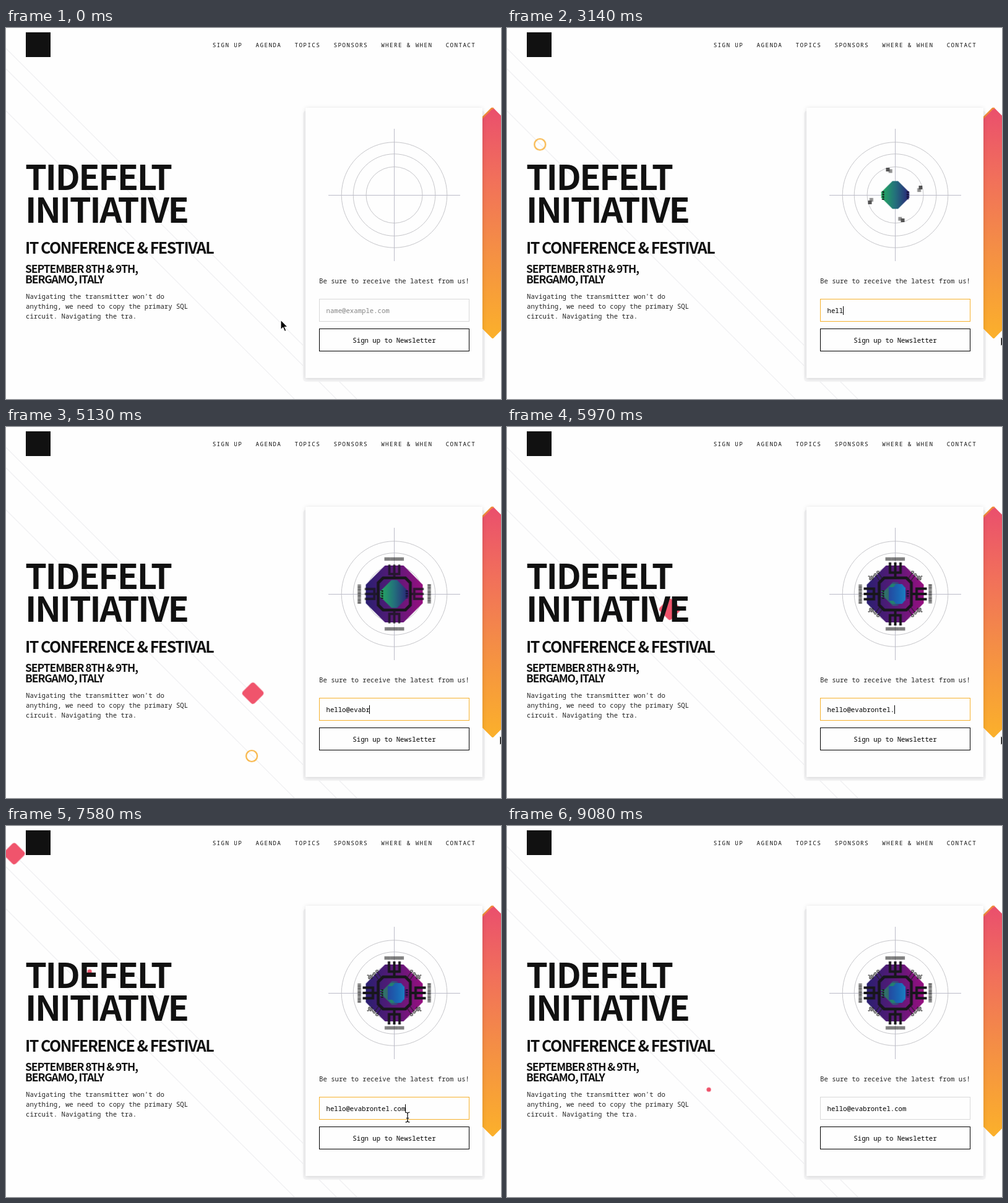
Recreate the animation shown at these times as an HTML page. Size 800 by 600 pixels, loop 9.18 s.

```html
<!DOCTYPE html>
<html lang="en">
<head>
<meta charset="utf-8">
<title>Conference sign-up</title>
<style>
html, body { margin: 0; width: 100%; height: 100%; overflow: hidden; background: #fefefe; }
svg { display: block; width: 800px; height: 600px; }
text { font: 10.667px "Noto Sans Mono", monospace; fill: #222; white-space: pre; }
.nav text { font-size: 9.333px; letter-spacing: 1.333px; fill: #111; }
.title text { font-family: "Noto Sans CJK JP", "Noto Sans CJK SC", "Noto Sans CJK", sans-serif; font-weight: 700; fill: #111; }
.title .h1 { font-size: 56px; font-weight: 900; letter-spacing: -2.4px; }
.title .h2 { font-size: 25px; letter-spacing: -1.5px; }
.title .h3 { font-size: 17.5px; letter-spacing: -1.1px; }
.card { filter: drop-shadow(0 1px 3px rgba(0, 0, 0, .13)); }
.cursor { filter: drop-shadow(0 0 .6px #fff); }

:where(.ring, .gem, .dot, .ghost, .chip g[class]) { animation: 9180ms linear infinite; }
.ring { animation-name: ring; }
.gem { animation-name: gem; }
.dot { animation-name: dot; }
.core { animation-name: core; }
.shrink { animation-name: shrink; }
.marks { animation-name: marks; }
.ghost { animation-name: ghost; }
.bars { animation-name: bars; }
.shield { animation-name: shield; }
.frame { animation-name: frame; }
.combs { animation-name: combs; }
.heart { animation-name: heart; }
.wires { animation-name: wires; }

@keyframes ring {
  0%, 28.76% { transform: translate(-15.4px, 119.6px); animation-timing-function: cubic-bezier(.333, .247, .667, .58); }
  63.18%, 100% { transform: translate(538.4px, 673.4px); }
}
@keyframes gem {
  0%, 43.57% { transform: translate(587.8px, 619.3px); animation-timing-function: cubic-bezier(.333, .354, .667, .688); }
  85.51%, 100% { transform: translate(-27.2px, 4.3px); }
}
@keyframes dot {
  0%, 67.54% { transform: translate(-8.1px, 92.1px); animation-timing-function: cubic-bezier(.333, .264, .667, .597); }
  100% { transform: translate(340px, 440.2px); }
}
@keyframes core {
  0%, 28.1% { transform: scale(0); animation-timing-function: ease-out; }
  31.6%, 100% { transform: none; }
}
@keyframes shrink {
  0%, 58% { transform: none; opacity: 1; }
  61.5%, 100% { transform: scale(.85); opacity: .65; }
}
@keyframes marks {
  0%, 32% { opacity: 0; transform: rotate(-25deg); animation-timing-function: ease-out; }
  34.2% { opacity: .75; transform: none; }
  36%, 100% { opacity: 1; transform: none; }
}
@keyframes ghost {
  0%, 34.2% { opacity: .65; transform: translate(4.2px, 2.4px); }
  36.5%, 100% { opacity: 0; transform: none; }
}
@keyframes bars {
  0%, 38.5% { opacity: 0; transform: scale(.85); animation-timing-function: ease-out; }
  42.5%, 100% { opacity: 1; transform: none; }
}
@keyframes shield {
  0%, 48.5% { opacity: 0; transform: scale(.5); animation-timing-function: ease-out; }
  52%, 100% { opacity: 1; transform: none; }
}
@keyframes frame {
  0%, 51% { opacity: 0; transform: scale(.7); animation-timing-function: ease-out; }
  54.5%, 100% { opacity: 1; transform: none; }
}
@keyframes combs {
  0%, 53.5% { opacity: 0; transform: scale(.7); animation-timing-function: ease-out; }
  57.5%, 100% { opacity: 1; transform: none; }
}
@keyframes heart {
  0%, 58% { opacity: 0; transform: scale(.6); animation-timing-function: ease-out; }
  61.5%, 100% { opacity: 1; transform: none; }
}
@keyframes wires {
  0%, 59.5% { opacity: 0; transform: scale(.88); animation-timing-function: ease-out; }
  63.5%, 100% { opacity: 1; transform: none; }
}
</style>
</head>
<body>
<svg viewBox="0 0 800 600">
  <defs>
    <linearGradient id="warm" gradientUnits="userSpaceOnUse" x1="790" y1="130" x2="778" y2="500">
      <stop offset="0" stop-color="#ea4f6d"/><stop offset=".3" stop-color="#f16f5b"/>
      <stop offset=".6" stop-color="#f48d46"/><stop offset="1" stop-color="#fbb02b"/>
    </linearGradient>
    <linearGradient id="cool">
      <stop offset="0" stop-color="#25ad60"/><stop offset=".5" stop-color="#23707c"/><stop offset="1" stop-color="#2a2479"/>
    </linearGradient>
    <linearGradient id="violet">
      <stop offset="0" stop-color="#2a1f70"/><stop offset=".5" stop-color="#5a1a78"/><stop offset="1" stop-color="#970f80"/>
    </linearGradient>
    <linearGradient id="blue">
      <stop offset="0" stop-color="#25489f"/><stop offset=".6" stop-color="#1a66b4"/><stop offset="1" stop-color="#1c7cc0"/>
    </linearGradient>
    <path id="mark" d="M-15 -44h6v6h-6z"/>
    <path id="bar" d="M-15.5 -56.5h31.5" stroke-width="5.5" stroke-dasharray="1.2 .9"/>
    <path id="comb" d="M-8.5 -51v16.5h17v-16.5M0 -51v24"/>
    <g id="wire">
      <path d="M21 -25l6 -8.5M25 -21l6.2 -8.3M35.5 -30v6q1 2.5 2 0v-4q1 -2.5 2 0v4q1 2.5 2 0v-4q1 -2.5 2 0"/>
      <circle cx="28" cy="-35.2" r="1.8"/><circle cx="32.4" cy="-30.8" r="1.8"/>
    </g>
  </defs>

  <rect width="800" height="600" fill="#fefefe"/>
  <path d="M0 33l567 567M0 66l534 534M0 134l466 466" fill="none" stroke="#f0f0f2" stroke-width="1.4"/>

  <circle class="ring" r="9" fill="none" stroke="#f8b545" stroke-width="2.2"/>
  <g class="gem"><rect x="-13.5" y="-13.5" width="27" height="27" rx="4.5" transform="rotate(45)" fill="#f0546c"/></g>
  <circle class="dot" r="3.6" fill="#ee5169"/>

  <rect x="32" y="7" width="40" height="40" fill="#111"/>
  <g class="nav">
    <text x="333.7" y="31">SIGN UP</text>
    <text x="403.6" y="31">AGENDA</text>
    <text x="466.5" y="31">TOPICS</text>
    <text x="529.5" y="31">SPONSORS</text>
    <text x="606.2" y="31">WHERE &amp; WHEN</text>
    <text x="710.7" y="31">CONTACT</text>
  </g>

  <g class="title">
    <text class="h1" x="31" y="262">TIDEFELT</text>
    <text class="h1" x="31" y="315">INITIATIVE</text>
    <text class="h2" x="31" y="364.5">IT CONFERENCE &amp; FESTIVAL</text>
    <text class="h3" x="31" y="395.5">SEPTEMBER 8TH &amp; 9TH,</text>
    <text class="h3" x="31" y="412.5">BERGAMO, ITALY</text>
  </g>
  <text x="32" y="438">Navigating the transmitter won't do</text>
  <text x="32" y="454">anything, we need to copy the primary SQL</text>
  <text x="32" y="470">circuit. Navigating the tra.</text>

  <rect x="480" y="134" width="294" height="438" rx="5" fill="#f4f4f5"/>
  <g stroke-linejoin="round">
    <path d="M786.5 131l30 30v309l-30 30l-30 -30v-309z" fill="url(#warm)" stroke="url(#warm)" stroke-width="4"/>
    <path d="M766 149l19 -19h3" fill="none" stroke="#ee8c3c" stroke-width="2.5"/>
  </g>
  <rect class="card" x="484" y="129" width="286" height="437" fill="#fefefe"/>

  <g transform="translate(627.5 270)" class="chip">
    <g fill="none" stroke="#c6c6ca">
      <circle r="45.5"/><circle r="66.3"/><circle r="85.3"/>
      <path d="M-106.5 .5h213M0 -107v214" stroke="#bcbcc9"/>
    </g>
    <g class="marks" fill="#1c1c1c" id="marks"></g>
    <g class="bars" stroke="#222" id="bars"></g>
    <g class="shield"><path d="M-15 -46h30l31 31v30l-31 31h-30l-31 -31v-30z" fill="url(#violet)"/></g>
    <g class="combs" fill="none" stroke="#18161c" stroke-width="4" id="combs"></g>
    <g class="wires" fill="none" stroke="#222" stroke-width="1.1" id="wires"></g>
    <g class="core">
      <g class="shrink"><path d="M-4.5 -22.5h9l18 18v9l-18 18h-9l-18 -18v-9z" fill="url(#cool)"/></g>
      <path d="M-19.7 -6v14" fill="none" stroke="#14251d" stroke-width="3.6" stroke-dasharray="2.8 1.2"/>
      <path d="M-21.5 -5v10" fill="none" stroke="#25ad60" stroke-width="1.6" stroke-dasharray="2 2"/>
      <path d="M20.3 -6v13" fill="none" stroke="#17143a" stroke-width="3.6" stroke-dasharray="2.8 1.2"/>
    </g>
    <g class="frame">
      <path d="M-18 -26h36l8 8v36l-8 8h-36l-8 -8v-36z" fill="none" stroke="#18161c" stroke-width="4.6"/>
    </g>
    <g class="heart">
      <path d="M-6 -16h17l5 6v20l-5 6h-17l-5 -6v-20z" fill="url(#blue)"/>
      <path d="M-6 -16h7l-4 5h-7zM-6 16h7l-4 -5h-7z" fill="#23806f"/>
    </g>
  </g>

  <text x="506" y="413">Be sure to receive the latest from us!</text>
  <rect id="field" x="506.5" y="438.5" width="242" height="36" fill="#fefefe" stroke="#d9d9d9"/>
  <text id="value" x="517.5" y="461"></text>
  <rect id="caret" y="450" width="1" height="14" fill="#000"/>
  <rect x="506.5" y="486.5" width="242" height="36" fill="#fefefe" stroke="#000"/>
  <text x="627.5" y="509" text-anchor="middle" style="fill:#000">Sign up to Newsletter</text>

  <g id="cursor" class="cursor">
    <path id="arrow" d="M0 0v16l3.7 -3.5l2.6 6l2.6 -1.1l-2.6 -5.9h5z" fill="#000" stroke="#fff" stroke-width="1.1"/>
    <path id="beam" d="M-3.5 -8q3.5 0 3.5 2.5v11q0 2.5 -3.5 2.5M3.5 -8q-3.5 0 -3.5 2.5M0 5.5q0 2.5 3.5 2.5M-2.2 1.5h4.4" fill="none" stroke="#000" stroke-width="1.2"/>
    <path id="hand" d="M-1.5 1q1.5 -2 3 0v6q2 -1 2.5 .5q2 -.8 2.5 .7q2 -.3 2.2 1.3v4l-2 4.5h-7l-5 -7q-.5 -2 1.5 -1.5l2.3 2z" fill="#fff" stroke="#000"/>
  </g>
</svg>
<script>
const LOOP = 9180, FOCUS = 1240, BLUR = 8250, CHAR = 6.4;
const EMAIL = 'hello@evabrontel.com', HINT = 'name@example.com';
const $ = id => document.getElementById(id);
const quarters = shape => [0, 90, 180, 270].map(a => `<g transform="rotate(${a})">${shape}</g>`).join('');

$('bars').innerHTML = quarters('<use href="#bar"/>');
$('combs').innerHTML = quarters('<use href="#comb"/>');
$('marks').innerHTML = quarters('<use href="#mark"/><use href="#mark" class="ghost"/>');
$('wires').innerHTML = ['1 1', '-1 1', '1 -1', '-1 -1'].map(s =>
  `<use href="#wire" transform="scale(${s})"/>`).join('');

// Key presses: a greeting, a pause before the domain, then a steady run
const keys = [2580, 2760, 2930, 3080, 3300, 3700];
while (keys.length < EMAIL.length) keys.push(4400 + (keys.length - 6) * 150);

// Cursor stops: time, x, y
const stops = [
  [0, 444, 472], [420, 444, 472], [940, 586.5, 462], [1410, 586.5, 462], [1690, 798, 499],
  [7140, 798, 499], [7580, 649, 471], [7700, 649, 472], [8100, 643, 506], [8300, 643, 506],
  [9000, 780, 606], [LOOP, 780, 606]
];
const smooth = u => u * u * (3 - 2 * u);

function cursorAt(t) {
  const i = stops.findIndex(s => s[0] > t);
  const [t0, x0, y0] = stops[i - 1], [t1, x1, y1] = stops[i];
  const u = smooth((t - t0) / (t1 - t0));
  return [x0 + (x1 - x0) * u, y0 + (y1 - y0) * u];
}

function caretOn(t, count) {
  if (t < FOCUS || t >= BLUR) return false;
  if (!count) return t < 1690 || t >= 2260;
  return (t - keys[count - 1]) % 1060 < 530;
}

function draw(t) {
  const count = keys.filter(k => k <= t).length;
  $('value').textContent = count ? EMAIL.slice(0, count) : HINT;
  $('value').style.fill = count ? '#000' : '#858585';
  $('field').setAttribute('stroke', t >= FOCUS && t < BLUR ? '#f5b12e' : '#d9d9d9');
  $('caret').setAttribute('x', 517 + Math.round(count * CHAR));
  $('caret').style.visibility = caretOn(t, count) ? 'visible' : 'hidden';

  const [x, y] = cursorAt(t);
  const inside = x > 506 && x < 749;
  const shape = inside && y > 438 && y < 475 ? 'beam' : inside && y > 486 && y < 523 ? 'hand' : 'arrow';
  $('cursor').setAttribute('transform', `translate(${x} ${y})`);
  for (const id of ['arrow', 'beam', 'hand']) $(id).style.display = id === shape ? '' : 'none';
}

let start;
function tick(now) {
  start ??= now;
  draw((now - start) % LOOP);
  requestAnimationFrame(tick);
}
draw(0);
requestAnimationFrame(tick);
</script>
</body>
</html>
```
